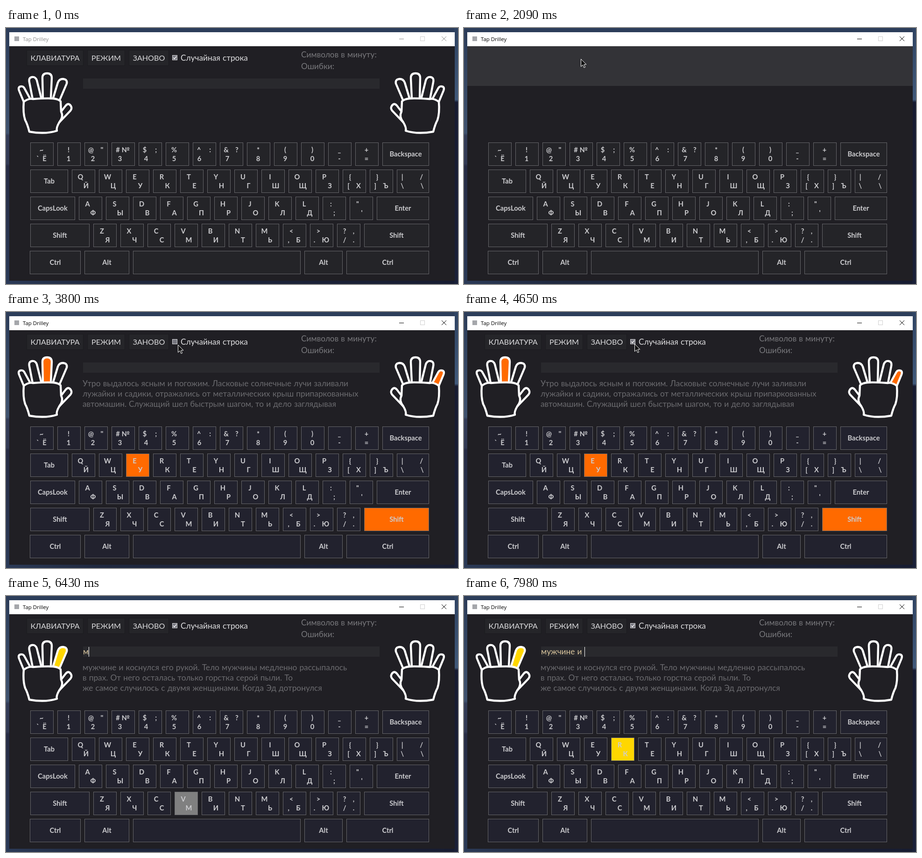
These frames come from a looping animation (968 px wide and 548 px high, 8000 ms). An HTML page:

```html
<!DOCTYPE html>
<html lang="ru">
<head>
<meta charset="utf-8">
<title>Tap Drilley</title>
<style>
html, body { margin: 0; width: 100%; height: 100%; overflow: hidden; background: #1b2338; }
svg { display: block; width: 968px; height: 548px; }
text { font-family: Lato, "Open Sans", sans-serif; white-space: pre; }
.caps { font-size: 16.1px; fill: #dcdcde; text-anchor: middle; }
.body { font-size: 17.3px; word-spacing: .7px; }
.key { font-size: 14.7px; font-weight: 700; fill: #cdcdd0; text-anchor: middle; }
.title { font: 11.4px "Open Sans", "Noto Sans", sans-serif; }
.hand path { stroke: #fff; stroke-width: 4.4; stroke-linejoin: round; stroke-linecap: round; }
</style>
</head>
<body>
<svg id="stage" viewBox="0 0 968 548">
  <defs>
    <linearGradient id="left" x2="0" y2="1">
      <stop offset="0" stop-color="#2c3c58"/><stop offset=".41" stop-color="#40536f"/>
      <stop offset=".42" stop-color="#343c57"/><stop offset=".53" stop-color="#333a54"/>
      <stop offset=".54" stop-color="#272c44"/><stop offset="1" stop-color="#2b3a57"/>
    </linearGradient>
    <linearGradient id="right" x2="0" y2="1">
      <stop offset="0" stop-color="#2f4362"/><stop offset=".28" stop-color="#40597a"/>
      <stop offset=".29" stop-color="#171b31"/><stop offset="1" stop-color="#1a2038"/>
    </linearGradient>
    <linearGradient id="base">
      <stop offset="0" stop-color="#2b3a57"/><stop offset=".2" stop-color="#20293f"/><stop offset="1" stop-color="#171c31"/>
    </linearGradient>
  </defs>
</svg>
<script>
const NS = 'http://www.w3.org/2000/svg';
const stage = document.getElementById('stage');
const BG = '#201f24', ORANGE = '#ff6a00', GREEN = '#4cff00', YELLOW = '#ffd700', PRESSED = '#808080';
const LOOP = 8000;

function el(parent, tag, attrs, text) {
  const node = document.createElementNS(NS, tag);
  for (const name in attrs) node.setAttribute(name, attrs[name]);
  if (text !== undefined) node.textContent = text;
  return parent.appendChild(node);
}
const rect = (parent, x, y, width, height, fill, more) =>
  el(parent, 'rect', { x, y, width, height, fill, ...more });
const label = (parent, x, y, cls, text, fill) =>
  el(parent, 'text', { x, y, class: cls, ...(fill && { fill }) }, text);
const group = (parent, attrs) => el(parent, 'g', attrs);
const show = (node, on) => node.setAttribute('visibility', on ? 'visible' : 'hidden');
const paint = (node, color) => node.setAttribute('fill', color);

// Desktop and window frame
rect(stage, 0, 0, 968, 548, 'url(#base)');
rect(stage, 0, 0, 968, 9, '#2c3d5a');
rect(stage, 0, 0, 8, 548, 'url(#left)');
rect(stage, 960, 0, 8, 548, 'url(#right)');
rect(stage, 7, 9, 954, 532, BG);
rect(stage, 7, 9, 954, 30, '#fff');
rect(stage, 18, 18, 10, 10, '#a4a6aa');
const title = label(stage, 36, 28, 'title', 'Tap Drilley');
const winButtons = el(stage, 'path', { d: 'M842 23.5h10M933 18l10 10M943 18l-10 10', fill: 'none' });
rect(stage, 887.5, 18.5, 9, 9, 'none', { stroke: '#d0d0d0' });

// Header
const main = group(stage);
const buttons = [['КЛАВИАТУРА', 44, 122], ['РЕЖИМ', 174, 81], ['ЗАНОВО', 263, 86]].map(([text, x, w]) => {
  const box = rect(main, x + .5, 47.5, w - 1, 33, '#252529', { stroke: '#1b1b1f' });
  label(main, x + w / 2, 70, 'caps', text);
  return { box, x, w };
});
rect(main, 356.5, 58.5, 10, 10, '#777780', { stroke: '#d6d6d8' });
const tick = el(main, 'path', { d: 'M358.5 63.5l2.3 2.6 4-5.2', fill: 'none', stroke: '#fff', 'stroke-width': 1.5 });
label(main, 374, 70, 'body', 'Случайная строка', '#e0e0e2');
label(main, 632, 63, 'body', 'Символов в минуту:', '#78787c');
label(main, 632, 88, 'body', 'Ошибки:', '#78787c');

// Input and sample text
rect(main, 165, 108, 635, 22, '#29292d');
const typedText = label(main, 165, 125, 'body', '', '#d8c49c');
const caret = rect(main, 165, 109, 1, 21, '#fff');
const lines = [0, 1, 2].map(i => label(main, 164, 159 + 22 * i, 'body', '', '#6b6b6f'));

// Hands
const FINGERS = {
  pinky: 'M38 158L28 134Q25 126 32 125Q37 124 40 130L52 152',
  ring: 'M57 152L50 116Q48 106 56 105Q63 104 66 112L75.5 150',
  middle: 'M79 151L78 107Q78 97 88 97Q98 97 98 107L96 151',
  index: 'M101 150L111 117Q114 109 122 109Q132 110 130 119L115 154',
  thumb: 'M118 179L128 166Q134 159 139 167Q142 172 138 177L114 202'
};
const PALM = 'M38 158Q48 150 58 152Q88 150 101 151Q112 152 117 157L118 179Q124 190 114 202' +
  'Q107 214 109 220Q84 228 50 222Q46 206 41 197Q36 182 38 158Z';
const fingers = {};
for (const side of ['left', 'right']) {
  const hand = group(main, { class: 'hand', ...(side === 'right' && { transform: 'matrix(-1 0 0 1 965 0)' }) });
  for (const name in FINGERS) fingers[side + ' ' + name] = el(hand, 'path', { d: FINGERS[name] });
  el(hand, 'path', { d: PALM, fill: BG });
}

// Keyboard
const keys = {};
function key(id, x, y, w, ...texts) {
  keys[id] = rect(stage, x + .5, y + .5, w - 1, 49, '#242428', { stroke: '#66666a' });
  if (texts.length === 1) label(stage, x + w / 2, y + 30, 'key', texts[0]);
  else texts.forEach(([text, dx], i) => label(stage, x + dx, y + 21 + 19 * i, 'key', text));
}
function letters(x, y, latin, cyrillic) {
  [...latin].forEach((ch, i) => key(cyrillic[i].toLowerCase(), x + 58 * i, y, 50, [ch, 18.5], [cyrillic[i], 30.5]));
}
[['~', '`  Ё'], ['!', '1'], ['@    "', '2', 18], ['# №', '3', 18], ['$     ;', '4', 16], ['%', '5', 18, 18],
 ['^     :', '6', 14], ['&    ?', '7', 16], ['*', '8'], ['(', '9'], [')', '0'], ['_', '-'], ['+', '=']]
  .forEach(([top, low, dxLow = 24, dxTop = 24], i) => key('n' + i, 52 + 58 * i, 245, 50, [top, dxTop], [low, dxLow]));
key('back', 806, 245, 100, 'Backspace');

key('tab', 52, 303, 81, 'Tab');
letters(141, 303, 'QWERTYUIOP', 'ЙЦУКЕНГШЩЗ');
key('х', 721, 303, 50, ['{', 16], ['[    Х', 24.5]);
key('ъ', 779, 303, 50, ['}', 16], [']    Ъ', 24.5]);
key('slash', 837, 303, 69, ['|' + ' '.repeat(10) + '/', 33], ['\\' + ' '.repeat(10) + '\\', 33]);

key('caps', 52, 361, 96, 'CapsLook');
letters(156, 361, 'ASDFGHJKL', 'ФЫВАПРОЛД');
key('ж', 678, 361, 50, [':', 18], [';', 25]);
key('э', 736, 361, 50, ['"', 17], ["'", 26]);
key('enter', 794, 361, 112, 'Enter');

key('lshift', 52, 419, 127, 'Shift');
letters(187, 419, 'ZXCVBNM', 'ЯЧСМИТЬ');
key('б', 593, 419, 50, ['<', 18], [',    Б', 24]);
key('ю', 651, 419, 50, ['>', 18], ['.    Ю', 24.5]);
key('dot', 709, 419, 50, ['?    ,', 25], ['/    .', 25]);
key('rshift', 767, 419, 139, 'Shift');

key('lctrl', 51, 477, 109, 'Ctrl');
key('lalt', 168, 477, 96, 'Alt');
key(' ', 272, 477, 359, '');
key('ralt', 639, 477, 82, 'Alt');
key('rctrl', 729, 477, 177, 'Ctrl');

// Drop-down panel and pointer
const panel = rect(stage, 7, 39, 954, 0, '#333337');
const panelItem = rect(stage, 140, 73, 234, 48, '#3c3c41');
const pointer = el(stage, 'path', {
  d: 'M.5 .5V16.5L4.3 13L7 19L9.6 17.9L7 12H12Z', fill: '#111', stroke: '#fff', 'stroke-linejoin': 'round'
});

// Timeline
const ACTIVE = 1850, MENU_OPEN = 2010, MENU_DONE = 3020, RESTART = 5590, TYPING = 6430;
const PANEL = [[0, 0], [MENU_OPEN, 20], [2090, 85], [2170, 116], [2870, 85], [2940, 20], [MENU_DONE, 0]];
const POINTER = [
  [610, 624, 383], [990, 419, 69], [1160, 419, 69], [1850, 250, 66], [2100, 250, 66], [2400, 252, 76],
  [2550, 252, 76], [2700, 244, 94], [3020, 244, 94], [3480, 300, 66], [3650, 300, 66], [3780, 368, 70],
  [4000, 368, 70], [4190, 365, 68], [4800, 365, 68], [5180, 312, 66], [5510, 312, 66], [5820, 320, 88]
];
const PRESSES = [TYPING, 6590, 6750, 7130, 7290, 7520, 7650, 7740, 7825, 7905];
const HOLD = 65;
const FIRST = [
  'Утро выдалось ясным и погожим. Ласковые солнечные лучи заливали',
  'лужайки и садики, отражались от металлических крыш припаркованных',
  'автомашин. Служащий шел быстрым шагом, то и дело заглядывая'
];
const SECOND = [
  'мужчине и коснулся его рукой. Тело мужчины медленно рассыпалось',
  'в прах. От него осталась только горстка серой пыли. То',
  'же самое случилось с двумя женщинами. Когда Эд дотронулся'
];
const HINTS = {
  'У': [ORANGE, ['у', 'rshift'], ['left middle', 'right pinky']],
  'м': [YELLOW, ['м'], ['left index']],
  'у': [ORANGE, ['у'], ['left middle']],
  'ж': [ORANGE, ['ж'], []],
  'ч': [GREEN, ['ч'], ['left ring']],
  'и': [YELLOW, ['и'], ['right index']],
  'н': [YELLOW, ['н'], ['right index']],
  'е': [YELLOW, ['е'], ['left index']],
  'к': [YELLOW, ['к'], ['left index']],
  ' ': [GREEN, [' '], []]
};

const within = (t, a, b) => t >= a && t < b;
const stepAt = (list, t) => list.filter(([start]) => t >= start).pop()[1];

function pointerAt(t) {
  const next = POINTER.findIndex(p => p[0] > t);
  if (next < 0) return POINTER[POINTER.length - 1].slice(1);
  if (next === 0) return POINTER[0].slice(1);
  const [a, b] = [POINTER[next - 1], POINTER[next]];
  const u = (t - a[0]) / (b[0] - a[0]), k = u * u * (3 - 2 * u);
  return [a[1] + (b[1] - a[1]) * k, a[2] + (b[2] - a[2]) * k];
}

function drawHints(t, count) {
  const loaded = t >= MENU_DONE;
  for (const id in keys) paint(keys[id], loaded ? '#22222e' : '#242428');
  for (const id in fingers) paint(fingers[id], BG);
  if (!loaded) return;
  const held = count > 0 && t < PRESSES[count - 1] + HOLD;
  const text = t < RESTART ? FIRST[0] : SECOND[0];
  const [color, keyIds, fingerIds] = HINTS[text[held ? count - 1 : count]];
  keyIds.forEach(id => paint(keys[id], held ? PRESSED : color));
  fingerIds.forEach(id => paint(fingers[id], color));
}

function render(t) {
  const active = t >= ACTIVE;
  paint(title, active ? '#000' : '#8c8c8c');
  winButtons.setAttribute('stroke', active ? '#000' : '#8c8c8c');

  show(main, !within(t, MENU_OPEN, MENU_DONE));
  panel.setAttribute('height', stepAt(PANEL, t));
  show(panelItem, within(t, 2550, 2870));

  const [x, y] = pointerAt(t);
  const pointerOn = within(t, 610, TYPING);
  pointer.setAttribute('transform', `translate(${x} ${y})`);
  show(pointer, pointerOn);
  for (const b of buttons) {
    const hover = pointerOn && x >= b.x && x < b.x + b.w && y >= 47 && y < 81;
    paint(b.box, hover ? '#47474b' : '#252529');
  }
  tick.setAttribute('opacity', within(t, 3780, 4420) ? 0 : 1);

  const sample = t < MENU_DONE ? [] : t < RESTART ? FIRST : SECOND;
  lines.forEach((line, i) => { line.textContent = sample[i] || ''; });
  const count = PRESSES.filter(p => t >= p).length;
  typedText.textContent = SECOND[0].slice(0, count);
  caret.setAttribute('x', 165 + Math.round(count ? typedText.getComputedTextLength() : 0));
  const caretOn = within(t, 3100, 3650) || within(t, 4190, 4500) || within(t, 5670, 6200) || t >= TYPING;
  caret.setAttribute('opacity', caretOn ? 1 : 0);

  drawHints(t, count);
}

const start = performance.now();
function frame() {
  render((performance.now() - start) % LOOP);
  requestAnimationFrame(frame);
}
frame();
</script>
</body>
</html>
```
